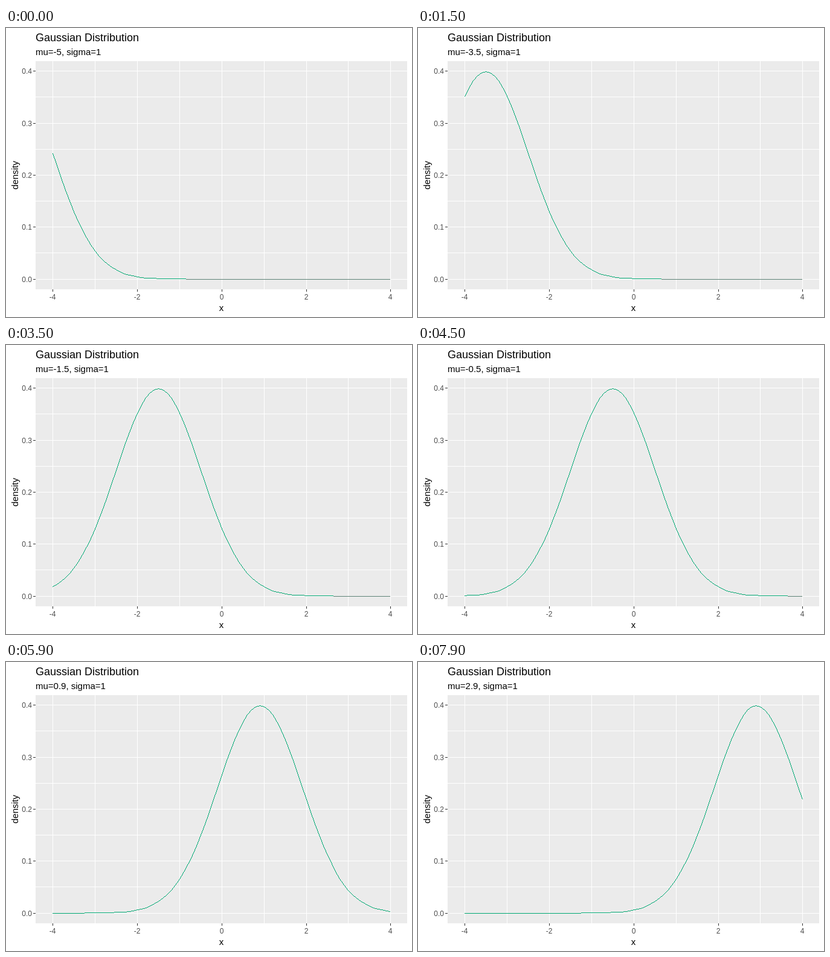
An HTML page with a canvas for the animation above (8 s loop, 672 by 480 pixels).

```html
<!DOCTYPE html>
<html lang="en">
<head>
<meta charset="utf-8">
<title>Gaussian Distribution</title>
<style>
  html, body { margin: 0; width: 100%; height: 100%; overflow: hidden; background: #fff; }
  canvas, svg { position: absolute; left: 0; top: 0; width: 672px; height: 480px; }
  text { font-family: "Liberation Sans", Arial, sans-serif; font-size: 15px; fill: #000; }
  .title { font-size: 18px; }
  .tick { font-size: 12px; fill: #4d4d4d; }
  .mid { text-anchor: middle; }
  .end { text-anchor: end; }
</style>
</head>
<body>
<canvas id="plot" width="672" height="480"></canvas>
<svg id="labels" viewBox="0 0 672 480">
  <text class="title" x="49" y="22">Gaussian Distribution</text>
  <text id="params" x="49" y="45"></text>
  <text class="mid" x="356.5" y="470">x</text>
  <text class="mid" transform="translate(20 244.5) rotate(-90)">density</text>
</svg>
<script>
const LOOP = 8000, STEP = 100;
const PANEL = { left: 49, top: 55, right: 664, bottom: 434 };
const GREEN = '#00a873', TAIL = '#5e8276';

const ctx = document.getElementById('plot').getContext('2d');
const labels = document.getElementById('labels');
const params = document.getElementById('params');

const px = v => Math.round(76.9 + 69.94 * (v + 4));
const py = d => Math.round(416.564 - 863.5 * d);
const density = z => Math.exp(-z * z / 2) / Math.sqrt(2 * Math.PI);

function rect(color, x, y, w, h) {
  ctx.fillStyle = color;
  ctx.fillRect(x, y, w, h);
}

function addLabel(text, x, y, align) {
  const el = document.createElementNS('http://www.w3.org/2000/svg', 'text');
  el.setAttribute('class', 'tick ' + align);
  el.setAttribute('x', x);
  el.setAttribute('y', y);
  el.textContent = text;
  labels.append(el);
}

function drawPanel() {
  const { left, top, right, bottom } = PANEL;
  rect('#fff', 0, 0, 672, 480);
  rect('#ebebeb', left, top, right - left, bottom - top);
  for (let v = -4; v <= 4; v++) {
    rect('#fff', px(v), top, 1, bottom - top);
    if (v % 2 === 0) rect('#333', px(v), bottom, 1, 4);
  }
  for (let i = 0; i <= 8; i++) {
    const y = py(i / 20);
    rect('#fff', left, y, right - left, 1);
    if (i % 2 === 0) rect('#333', left - 4, y, 4, 1);
  }
}

// Aliased one-pixel line between whole-pixel points.
function drawLine(x0, y0, x1, y1, plot) {
  const n = Math.max(Math.abs(x1 - x0), Math.abs(y1 - y0));
  for (let i = 0; i < n; i++) {
    plot(Math.round(x0 + (x1 - x0) * i / n), Math.round(y0 + (y1 - y0) * i / n));
  }
}

function drawCurve(mu) {
  const base = py(0), peak = px(mu);
  const plot = (x, y) => rect(y === base && x > peak ? TAIL : GREEN, x, y, 1, 1);
  let last = null;
  for (let i = -40; i <= 40; i++) {
    const point = [px(i / 10), py(density(i / 10 - mu))];
    if (last) drawLine(...last, ...point, plot);
    last = point;
  }
}

for (let v = -4; v <= 4; v += 2) addLabel(v, px(v), 451, 'mid');
for (let i = 0; i <= 4; i++) addLabel((i / 10).toFixed(1), 43, py(i / 10) + 5, 'end');

let shown = -1;
function tick() {
  const step = Math.floor(performance.now() % LOOP / STEP);
  if (step !== shown) {
    shown = step;
    const mu = (step - 50) / 10;
    drawPanel();
    drawCurve(mu);
    params.textContent = `mu=${mu}, sigma=1`;
  }
  requestAnimationFrame(tick);
}
tick();
</script>
</body>
</html>
```
